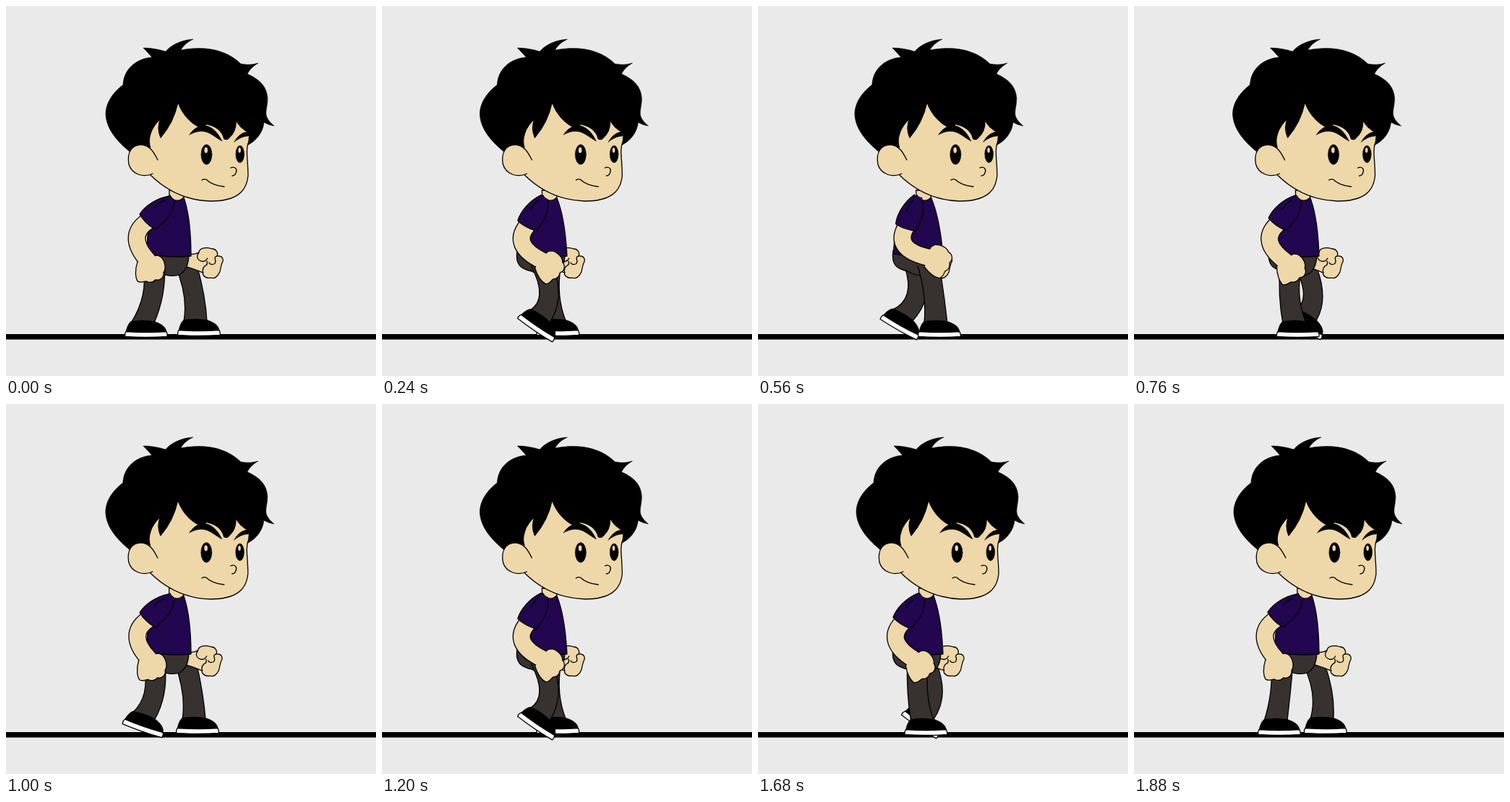
An HTML page that plays this animation: 512 by 512 pixels, repeating every 1920 ms.

```html
<!DOCTYPE html>
<html lang="en">
<head>
<meta charset="utf-8">
<title>Walking boy</title>
<style>
  html, body { margin: 0; width: 100%; height: 100%; overflow: hidden; background: #eaeaea; }
  svg { display: block; width: 100%; height: 100%; }
  path, ellipse { stroke: #000; stroke-width: 1.3; stroke-linejoin: round; stroke-linecap: round; }
  .skin { fill: #eed7a9; }
  .shirt { fill: #22064f; }
  .pants { fill: #37322f; }
  .ink { fill: #000; stroke-width: .6; }
  .sole { fill: #fff; }
  .line { fill: none; }
  .bare { stroke: none; }
  .limb { fill: none; stroke-width: 25; stroke-linecap: butt; }
  .limb.inner { stroke: #eed7a9; stroke-width: 22.4; stroke-linecap: round; }
</style>
</head>
<body>
<svg viewBox="0 0 512 512">
  <defs>
    <g id="shoe">
      <path class="ink" d="M-57-7C-56-14-53-20-50-22Q-33-25-18-22C-8-19-1-14-1-7Z"/>
      <path class="sole" d="M-58-1Q-59-5-57-8Q-29-6-1-8Q1-4 0-1Q-29 1-58-1Z"/>
    </g>
  </defs>
  <rect width="512" height="512" fill="#eaeaea"/>
  <rect y="454" width="512" height="7.5"/>

  <g id="farLeg">
    <path class="pants bare"/><path class="line"/><use href="#shoe"/>
  </g>
  <g id="farArm">
    <path class="skin" d="M250 342C258 345 262 343 267 341C268 335 276 333 285 336C292 336 294 343 292 346C300 345 302 351 299 356C297 361 297 365 296 368C293 375 288 378 284 376C277 378 271 372 273 369C265 366 258 363 250 361Z"/>
    <path class="line" d="M267 341Q262 348 268 352Q275 356 279 349M292 346C285 348 294 354 288 357Q283 359 281 355M278 353Q280 358 275 360Q271 364 273 369"/>
  </g>
  <path class="pants" d="M187 338C184 358 192 364 207 367C217 373 232 375 240 372C249 367 253 358 253 343Z"/>
  <g id="nearLeg">
    <path class="pants bare"/><path class="line"/><use href="#shoe"/>
  </g>

  <g id="body">
    <path class="skin" d="M226 255V262C232 273 240 273 246 265V255Z"/>
    <path id="torso" class="shirt"/>
  </g>
  <path id="armEdge" class="limb"/>
  <path id="fist" class="skin" d="M-14 2C-18 14-17 24-14 29C-9 32-5 29-2 29C3 32 8 30 11 27C18 29 23 23 22 17C26 12 24 1 19-4C16-6 12-7 10-6Z"/>
  <path id="armFill" class="limb inner"/>
  <g id="sleeve">
    <path class="shirt bare" d="M226 263C208 266 192 277 185 288C190 297 198 304 206 309C220 298 231 289 233 271Z"/>
    <path class="line" d="M226 263C208 266 192 277 185 288C190 297 198 304 206 309C220 298 231 289 233 271M206 279Q211 273 220 269"/>
  </g>

  <g id="head">
    <path class="ink" d="M174 204C153 187 139 170 138 150C138 133 149 119 162 109C163 88 179 73 202 71C198 66 194 62 190 58C201 58 212 60 221 63C228 54 243 47 259 46C251 50 246 54 242 61C275 55 304 60 325 80C335 82 342 81 349 79C342 83 337 88 334 94C352 102 361 112 362 128C362 139 358 147 361 154C364 160 368 163 371 166Q364 165 357 161C356 173 348 185 337 191L300 215L215 215Z"/>
    <path class="skin" d="M200 197C195 184 201 167 214 156C209 167 211 175 214 182C226 168 234 152 238 133C244 150 258 166 275 170Q278 167 275 163C288 165 299 171 302 184Q306 186 309 182C316 176 319 168 318 157C322 166 329 172 337 175L336 187C331 199 335 212 335 235C333 256 320 270 283 270C250 269 222 256 199 233Z"/>
    <path class="skin bare" d="M202 196L208 212L200 233L190 230V196Z"/>
    <path class="skin" d="M203 232C190 238 174 233 170 219C167 203 174 192 187 192C199 192 205 203 210 213"/>
    <path class="ink" d="M254 178C261 167 272 163 281 167C290 171 295 179 299 187C290 182 284 176 276 174C267 172 260 175 254 178Z"/>
    <path class="ink" d="M316 188C321 179 328 174 336 174Q338 178 335 180C328 180 321 184 316 188Z"/>
    <ellipse class="ink" cx="277.500" cy="205.500" rx="7.500" ry="13.800"/>
    <ellipse class="ink" cx="323.800" cy="205" rx="5.800" ry="11.800"/>
    <ellipse class="skin bare" cx="276.800" cy="199.500" rx="2.300" ry="4"/>
    <ellipse class="skin bare" cx="323.200" cy="199.500" rx="1.800" ry="3.500"/>
    <path class="line" d="M311 224C317 221 320 226 318.500 230Q317 235 313 235"/>
    <path class="line" d="M271 241Q274 239 277 240C283 246 292 249 302 250"/>
  </g>
</svg>
<script>
const CYCLE = 960, STEP = 40, TAU = 2 * Math.PI;
const LIFT = 80, LAND = 480;
const SHOULDER = [220, 270];
const $ = id => document.getElementById(id);
const set = (id, name, value) => $(id).setAttribute(name, value);

function turn([x, y], degrees) {
  const r = degrees * Math.PI / 180, c = Math.cos(r), s = Math.sin(r);
  return [x * c - y * s, x * s + y * c];
}
const add = (a, b) => [a[0] + b[0], a[1] + b[1]];

// The foot swings forward between LIFT and LAND, then slides back on the ground.
function footX(t) {
  if (t > LIFT && t < LAND) {
    const p = (t - LIFT) / (LAND - LIFT);
    return 208 + 77 * p * p * (3 - 2 * p);
  }
  const p = (t - LAND + CYCLE) % CYCLE / (CYCLE - LAND + LIFT);
  return 285 - 77 * p ** 1.4;
}

function drawLeg(id, t, dx, dy) {
  t %= CYCLE;
  const phase = t / CYCLE * TAU;
  const heel = t < 430 ? Math.sin(Math.PI * (t / 430) ** 0.75) : 0;
  const angle = 38 * heel;
  const toe = [footX(t) + dx, 458.5 + 8 * heel + dy];
  const hip = [221.5 - 17 * Math.cos(phase) + dx, 360];
  const knee = [226 - 23 * Math.cos(phase) + 5 * Math.sin(phase) + dx, 400];
  const ankle = add(toe, turn([-34, -20], angle));
  const bend = [0, 1].map(i => 2 * knee[i] - (hip[i] + ankle[i]) / 2);
  const [left, right] = [-1, 1].map(k => ({
    hip: add(hip, [15 * k, 0]),
    bend: add(bend, [12 * k, 0]),
    ankle: add(ankle, turn([16 * k, 0], angle))
  }));
  const back = `M${left.hip}Q${left.bend} ${left.ankle}`;
  const [fill, edge, shoe] = $(id).children;
  fill.setAttribute("d", `${back}L${right.ankle}Q${right.bend} ${right.hip}Z`);
  edge.setAttribute("d", `${back}M${right.hip}Q${right.bend} ${right.ankle}`);
  shoe.setAttribute("transform", `translate(${toe}) rotate(${angle})`);
}

function drawArm(swing) {
  const shoulder = add(SHOULDER, [-6.5 * swing, 0]), raise = -29 * swing;
  const cuff = add(shoulder, turn([-24, 28], raise));
  const elbow = add(shoulder, turn([-54, 48], raise));
  const wrist = add(elbow, turn([45 + 7 * swing, 0], 48.6 - 40 * swing));
  const d = `M${cuff}Q${elbow} ${wrist}`;
  set("armEdge", "d", d);
  set("armFill", "d", d);
  set("fist", "transform", `translate(${wrist}) rotate(${-60 * swing})`);
  set("sleeve", "transform", `translate(${-6.5 * swing} 0) rotate(${raise} ${SHOULDER})`);
}

function drawBody(swing) {
  const lean = swing / 11;
  set("body", "transform", `matrix(1 0 ${lean} 1 ${-346 * lean} 0)`);
  set("torso", "d", `M227 262C232 271 240 271 246 265C253 285 256 315 256 346
    Q225 349 ${195 - 8 * swing} 343C${196 - 7 * swing} 325 194 300 207 277Z`);
}

function draw(t) {
  const swing = (1 - Math.cos((t + 20) / CYCLE * TAU)) / 2;
  drawLeg("nearLeg", t, 0, 0);
  drawLeg("farLeg", t + CYCLE / 2, 11, -2);
  drawBody(swing);
  drawArm(swing);
  set("farArm", "transform", `translate(${-35.5 * swing} 0)`);
  set("head", "transform", `translate(${-4.6 * swing} 0)`);
}

const start = performance.now();
function tick() {
  const t = performance.now() - start;
  draw(Math.floor(t / STEP) * STEP % CYCLE);
  requestAnimationFrame(tick);
}
tick();
</script>
</body>
</html>
```
